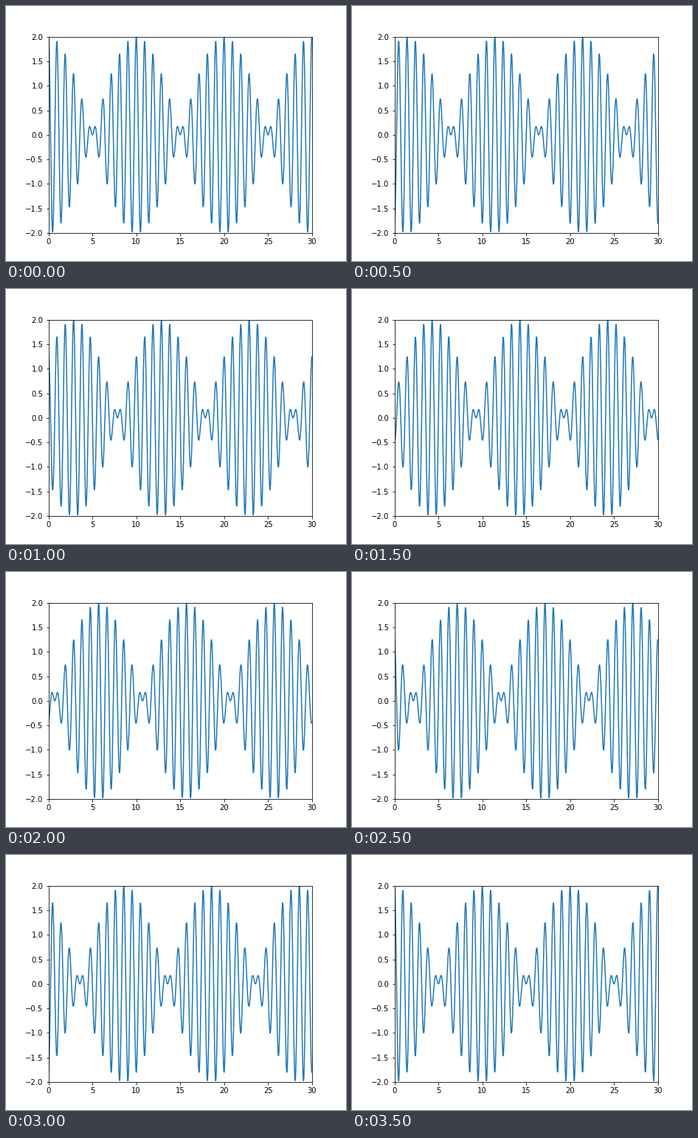
A matplotlib script for the animation above (4 s loop, 461x346 px).

```python
import numpy as np
import matplotlib.pyplot as plt
from matplotlib.animation import FuncAnimation

WIDTH, HEIGHT, DPI = 461, 346, 72
FRAMES, INTERVAL = 8, 500
BEAT_LENGTH = 10

x = np.linspace(0, 30, 1000)
shifts = np.linspace(0, BEAT_LENGTH, FRAMES)


def beat(u):
    """Sum of two waves with nearby frequencies."""
    return np.cos(2 * np.pi * u) + np.cos(2.2 * np.pi * u)


fig, ax = plt.subplots(figsize=(WIDTH / DPI, HEIGHT / DPI), dpi=DPI)
fig.subplots_adjust(left=57.6 / WIDTH, right=414.72 / WIDTH,
                    bottom=38.016 / HEIGHT, top=304.128 / HEIGHT)
ax.set_xlim(0, 30)
ax.set_ylim(-2, 2)
wave, = ax.plot(x, beat(x), color="#1f77b4", lw=1.5)


def update(i):
    wave.set_ydata(beat(x - shifts[i]))
    return wave,


anim = FuncAnimation(fig, update, frames=FRAMES, interval=INTERVAL,
                     repeat=True, repeat_delay=0)
plt.show()
```
